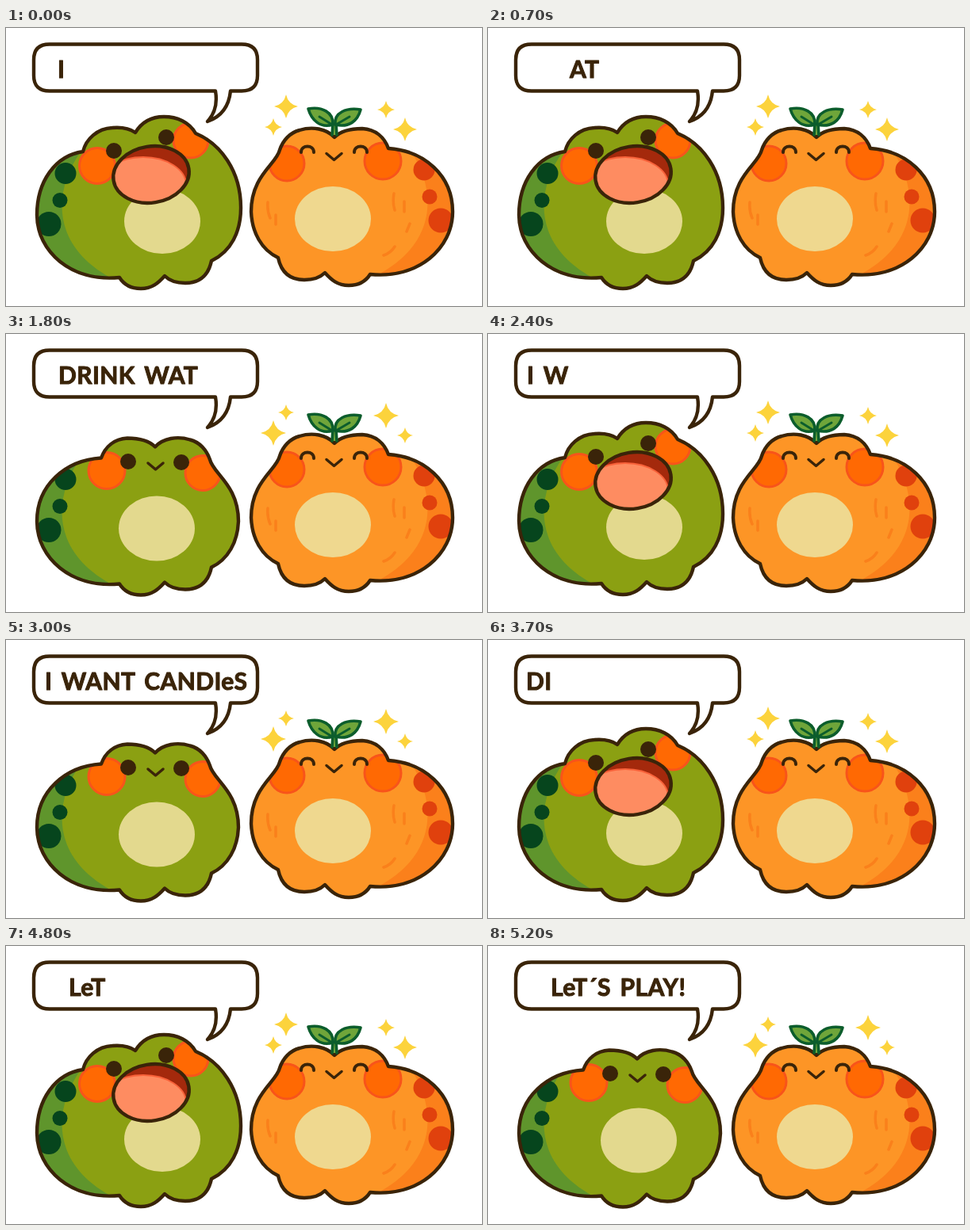
Recreate the animation shown at these times as an HTML page. Size 600x351 px, loop 5300 ms.

```html
<!DOCTYPE html>
<html lang="en">
<head>
<meta charset="utf-8">
<title>Chatty frogs</title>
<style>
  html, body { margin: 0; width: 100%; height: 100%; overflow: hidden; background: #fff; }
  svg { display: block; width: 100vw; height: 100vh; }
  text { font: 700 30px Lato, sans-serif; letter-spacing: .4px; word-spacing: 4px; fill: #3a2409; stroke: #3a2409; stroke-width: 1; stroke-linejoin: round; white-space: pre; }
  .line { fill: none; stroke: #3a2409; stroke-width: 4.4; stroke-linejoin: round; stroke-linecap: round; }
  .cheek { fill: #ff6903; stroke: #f8541a; stroke-width: 3; }
  .belly { fill: #e3d98e; }
  .leaf { fill: #6fa53a; stroke: #0c5d2c; stroke-width: 3.6; stroke-linejoin: round; stroke-linecap: round; }
</style>
</head>
<body>
<svg viewBox="0 0 600 351">
  <defs>
    <path id="body" d="M414 138C404 127 386 124 370 129C358 132 349 142 345 154C341 172 309 186 309 232C310 258 322 280 343 290C347 309 358 318 376 318C388 318 396 315 402 309C410 318 418 325 432 325C446 325 454 319 459 311C520 317 563 278 563 232C563 186 527 155 482 152C477 138 466 128 449 127C435 127 422 130 414 138Z"/>
    <path id="raised" d="M163 132C171 119 184 112 199 112C216 112 231 119 239 133C270 146 296 180 296 227C296 257 284 282 259 294C255 313 244 322 226 322C214 322 206 319 200 313C192 322 184 329 170 329C156 329 148 323 143 315C82 321 39 282 39 236C39 194 62 161 97 156C101 140 115 127 134 126C146 125 156 127 163 132Z"/>
    <path id="shade" d="M508 152C542 200 548 272 464 314L575 330V150Z"/>
    <g id="spots">
      <circle cx="527" cy="179" r="13.5"/>
      <circle cx="534" cy="213" r="9.5"/>
      <circle cx="548" cy="243" r="15.5"/>
    </g>
    <g id="cheeks" class="cheek">
      <circle cx="354" cy="171" r="22"/>
      <circle cx="475" cy="168" r="23"/>
    </g>
    <ellipse id="belly" cx="412" cy="241" rx="48" ry="41"/>
    <path id="smile" d="M404 158.500L413.500 166.500L423 158.500" class="line" style="stroke-width:3.5"/>
    <path id="star" d="M0-1Q.18-.18 1 0Q.18.18 0 1Q-.18.18-1 0Q-.18-.18 0-1Z" fill="#fcd33c"/>
    <clipPath id="inBody"><use href="#body"/></clipPath>
    <clipPath id="inRaised"><use href="#raised"/></clipPath>
    <ellipse id="mouth" cx="183" cy="185" rx="48" ry="35.5" transform="rotate(-9 183 185)"/>
    <clipPath id="inMouth"><use href="#mouth"/></clipPath>
  </defs>

  <path class="line" d="M55 20.500H297Q317 20.500 317 40V60Q317 79.500 297 79.500H283Q280 109 254 118Q268 103 264 79.500H55Q35 79.500 35 60V40Q35 20.500 55 20.500Z"/>
  <text id="speech" y="62.500"></text>

  <g id="closed">
    <g transform="matrix(-1 0 0 1 602 4.500)">
      <g clip-path="url(#inBody)">
        <use href="#body" fill="#8ba012"/>
        <use href="#shade" fill="#5f952c"/>
        <use href="#spots" fill="#06451d"/>
        <use href="#cheeks"/>
      </g>
      <use href="#belly" class="belly"/>
      <use href="#body" class="line"/>
      <use href="#smile"/>
    </g>
    <g fill="#3a2409"><circle cx="154" cy="161" r="10"/><circle cx="221" cy="162" r="10"/></g>
  </g>

  <g id="open">
    <g clip-path="url(#inRaised)">
      <use href="#raised" fill="#8ba012"/>
      <g transform="matrix(-1 0 0 1 602 4.500)">
        <use href="#shade" fill="#5f952c"/>
        <use href="#spots" fill="#06451d"/>
      </g>
      <g class="cheek"><circle cx="115" cy="174" r="22.500"/><circle cx="233" cy="142" r="22"/></g>
    </g>
    <use href="#belly" class="belly" x="-215" y="3"/>
    <use href="#raised" class="line"/>
    <g fill="#3a2409"><circle cx="136" cy="155" r="10"/><circle cx="202" cy="138" r="10"/></g>
    <g clip-path="url(#inMouth)">
      <use href="#mouth" fill="#a4290c"/>
      <ellipse cx="173" cy="198" rx="54" ry="35" fill="#fe8c61" stroke="#f8623a" stroke-width="2"/>
    </g>
    <use href="#mouth" class="line"/>
  </g>

  <g clip-path="url(#inBody)">
    <use href="#body" fill="#fd9526"/>
    <use href="#shade" fill="#fb801b"/>
    <use href="#spots" fill="#e0410d"/>
    <use href="#cheeks"/>
  </g>
  <use href="#belly" fill="#efd88f"/>
  <path d="M330 220Q329 231 333 240M340 236V248M489 209Q487 220 490 230M502 219V232M490 276Q485 284 476 287M509 247L505 257" fill="none" stroke="#fa801b" stroke-width="3.500" stroke-linecap="round"/>
  <use href="#body" class="line"/>
  <use href="#smile"/>
  <path class="line" style="stroke-width:4" d="M372 157C372 147 388 147 388 157M439 157C439 147 455 147 455 157"/>
  <g class="leaf">
    <path d="M411 135L412 121H416L417 135"/>
    <path d="M412 122C396 127 385 116 381 102C398 99 413 106 412 122Z"/>
    <path d="M415 122C413 107 429 100 447 103C443 118 432 126 415 122Z"/>
    <path d="M395 112L411 122M433 112L416 122" style="stroke-width:3"/>
  </g>
  <g id="stars"></g>
</svg>
<script>
  // start tick, left edge, words
  const phrases = [
    [0, 65, "I NeeD YOUR"],
    [6.5, 103, "ATTeNTION"],
    [14, 66, "DRINK WATeR"],
    [23, 49, "I WANT CANDIeS"],
    [36.5, 48, "DID YOU MISS Me"],
    [47, 79, "LeT´S PLAY!"]
  ];
  // x, y, radius with mouth open, radius with mouth closed
  const stars = [[353, 99, 15, 10], [503, 128, 15, 10], [337, 125, 11, 16], [479, 103, 11, 16]];
  const $ = id => document.getElementById(id);
  const HALF = 6.25;

  function draw(now) {
    const tick = Math.floor(now % 5300 / 100);
    const open = (tick + 2 * HALF - 6.6) % (2 * HALF) < HALF;
    const [start, x, words] = phrases.findLast(p => p[0] <= tick);

    $("speech").setAttribute("x", x);
    $("speech").textContent = words.slice(0, 1 + 2 * (tick - start));
    $("open").style.display = open ? "" : "none";
    $("closed").style.display = open ? "none" : "";
    $("stars").innerHTML = stars.map(([sx, sy, big, small]) =>
      `<use href="#star" transform="translate(${sx} ${sy}) scale(${open ? big : small})"/>`).join("");
  }

  function loop() {
    draw(performance.now());
    requestAnimationFrame(loop);
  }
  loop();
</script>
</body>
</html>
```
